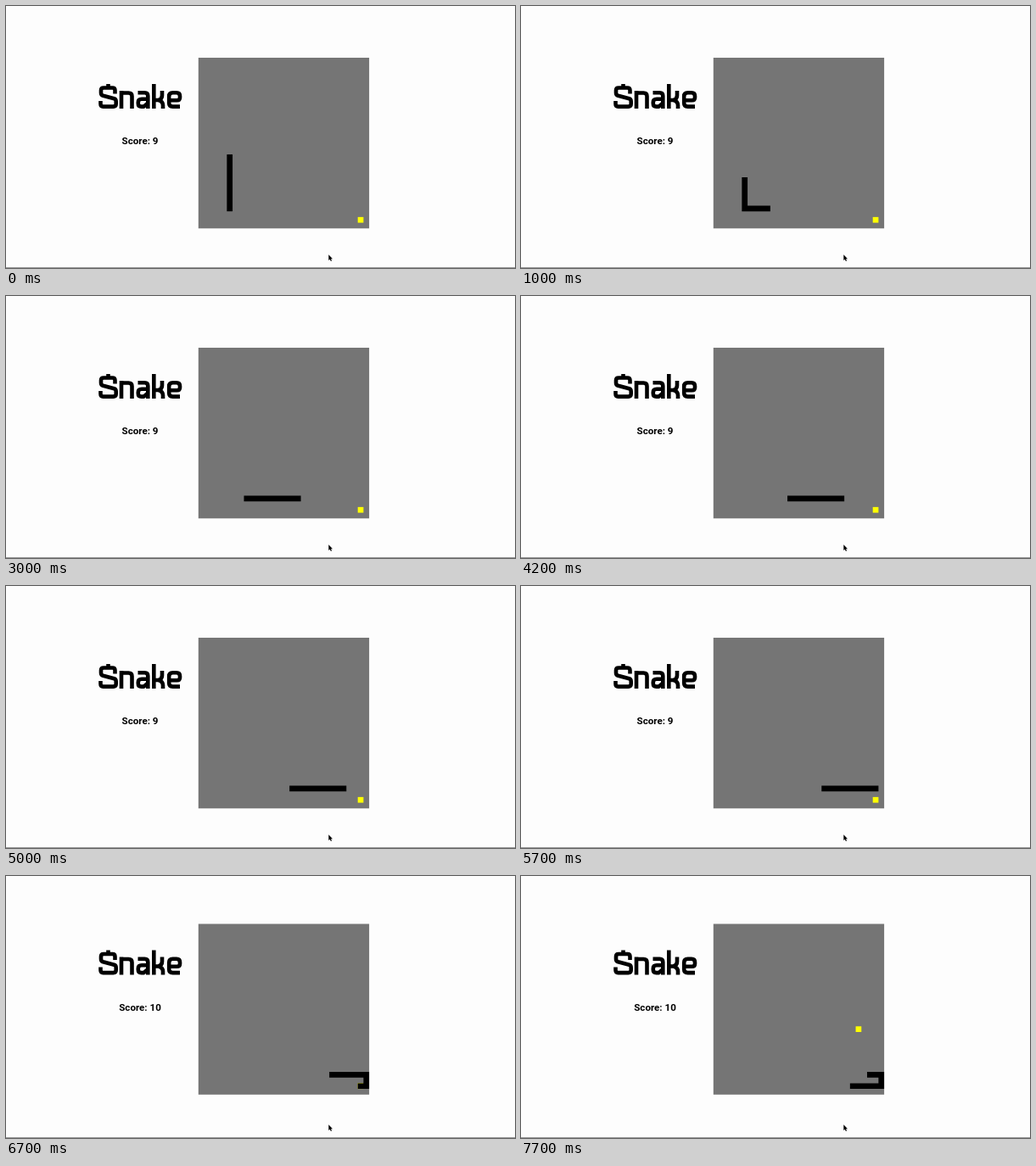
Write an HTML page that moves like this. It is 600 px wide and 309 px high and loops after 8 s.

```html
<!DOCTYPE html>
<html lang="en">
<head>
<meta charset="utf-8">
<title>Snake</title>
<style>
  html, body { margin: 0; width: 100%; height: 100%; overflow: hidden; background: #fdfdfd; }
  svg { display: block; width: 600px; height: 309px; }
  #score { font: 700 11.6px Roboto, sans-serif; text-anchor: middle; }
  .line { fill: none; stroke: #000; }
</style>
</head>
<body>
<svg viewBox="0 0 600 309">
  <rect width="600" height="309" fill="#fdfdfd"/>
  <g id="page">
    <g class="line" stroke-width="4.6" stroke-linejoin="round" role="img" aria-label="Snake">
      <path d="M128.5 103.5V99.5Q128.5 96.5 125.5 96.5H115Q112 96.5 112 99.5V102.5Q112 105 114.500 105.800L127.500 109.200Q129.700 110 129.700 112.500V115.500Q129.700 118.600 126.500 118.600H114.500Q111.500 118.600 111.500 115.500V112M120.500 92V97"/>
      <path d="M136 121V100M136 102.500H144.500Q148.500 102.500 148.500 106.500V121"/>
      <path d="M155.500 102.200H163.500Q167.300 102.200 167.300 106V121M167.300 109.800H160Q155.800 109.800 155.800 113.500V115Q155.800 118.600 159.500 118.600H162.500L167.300 114.500"/>
      <path d="M174.300 92V121M174.500 111H179.500Q184 110 184 105.500V100M179.500 111Q185 112.500 185 117V121"/>
      <path d="M205 118.600H196.500Q192.200 118.600 192.200 114.500V106.500Q192.200 102.300 196.500 102.300H201Q205 102.300 205 106.300V108Q205 111.300 201.500 111.300H192.500"/>
    </g>
    <text id="score" x="158" y="163"></text>
    <g transform="translate(226.800 61)">
      <rect width="201.300" height="201.300" fill="#757575"/>
      <rect id="food" width="6.710" height="6.710" fill="#ff0"/>
      <polyline id="snake" class="line" stroke-width="6.710" stroke-linecap="square" stroke-linejoin="miter"/>
    </g>
  </g>
  <rect y="308" width="600" height="1" fill="#999"/>
  <path d="M380.300 293.300V300L381.800 298.700L382.900 301L384 300.500L383 298.300H385Z" fill="#000" stroke="#fff" stroke-width=".5" paint-order="stroke"/>
</svg>
<script>
  const LOOP = 8000, CELL = 6.71, LENGTH = 10, EAT = 27;
  const $ = id => document.getElementById(id);
  const page = $('page'), score = $('score'), food = $('food'), snake = $('snake');

  // Ticks alternate between 200 and 300 ms, apart from the slower start.
  function tickAt(t) {
    if (t < 1000) return (t >= 200) + (t >= 400) + (t >= 700);
    return 2 * Math.floor(t / 500) + (t % 500 >= 200);
  }

  // Grid cell the head occupies at a tick: down, right, down, left.
  function cellAt(n) {
    if (n <= 0) return [5, 26 + n];
    if (n <= 24) return [5 + n, 26];
    if (n <= 26) return [29, n + 2];
    return [55 - n, 28];
  }

  function draw(t) {
    const n = tickAt(t);
    const points = [];
    for (let i = n - LENGTH + 1; i <= n; i++) {
      // A half-width square cap fills out the end cells.
      points.push(cellAt(i).map(v => ((v + 0.5) * CELL).toFixed(2)).join());
    }
    snake.setAttribute('points', points.join(' '));

    const [col, row] = n > EAT ? [25, 18] : [28, 28];
    food.setAttribute('x', col * CELL);
    food.setAttribute('y', row * CELL);
    score.textContent = 'Score: ' + (n >= EAT ? 10 : 9);
    page.setAttribute('transform', `translate(0 ${t >= 6000 ? -4.5 : 0})`);
  }

  const start = performance.now();
  function frame() {
    draw((performance.now() - start) % LOOP);
    requestAnimationFrame(frame);
  }
  frame();
</script>
</body>
</html>
```
